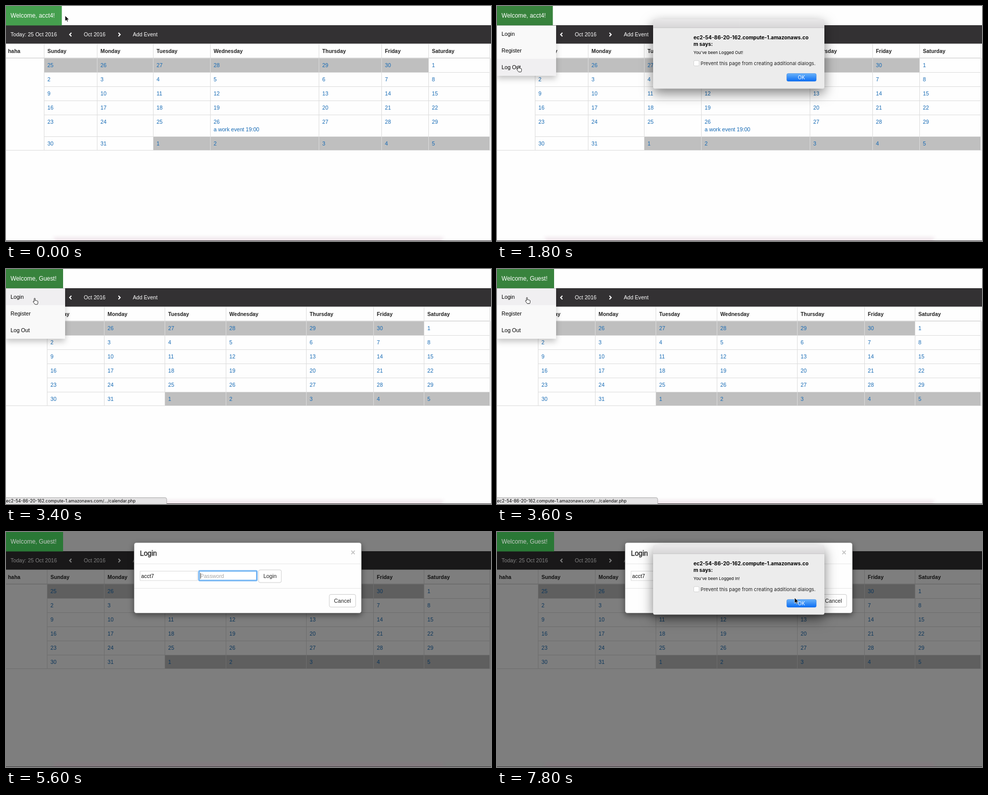
Write an HTML page that moves like this. It is 960 by 465 pixels and loops after 8 s.

```html
<!DOCTYPE html>
<html lang="en">
<head>
<meta charset="utf-8">
<title>Calendar login</title>
<style>
  html, body { margin: 0; width: 100%; height: 100%; overflow: hidden; background: #fefefe; }
  svg { display: block; width: 960px; height: 465px; font: 10.7px "Liberation Sans", Arial, sans-serif; }
  .link { fill: #1469b4; }
  .head { font-weight: bold; font-size: 10.4px; fill: #222; }
  .nav { fill: #fff; font-size: 10.6px; }
  .mac { font-family: Inter, sans-serif; }
  .menu { filter: drop-shadow(0 6px 6px rgba(0,0,0,.22)); }
  .modal { filter: drop-shadow(0 4px 6px rgba(0,0,0,.45)); }
  .alert { filter: drop-shadow(0 9px 12px rgba(0,0,0,.5)); }
</style>
</head>
<body>
<svg id="stage" viewBox="0 0 960 465"></svg>
<script>
const STEP = 200, LOOP = 8000;
const HOST = "ec2-54-86-20-162.compute-1.amazonaws.co";
const DAYS = ["Sunday", "Monday", "Tuesday", "Wednesday", "Thursday", "Friday", "Saturday"];
const OLD_USER = "acct4", NEW_USER = "acct7";

const rect = (x, y, w, h, fill, extra = "") =>
  `<rect x="${x}" y="${y}" width="${w}" height="${h}" fill="${fill}" ${extra}/>`;
const text = (x, y, s, extra = "") => `<text x="${x}" y="${y}" ${extra}>${s}</text>`;
const path = (d, stroke, width = 1, fill = "none") =>
  `<path d="${d}" fill="${fill}" stroke="${stroke}" stroke-width="${width}"/>`;
const middle = 'text-anchor="middle"';

const defs = `<defs>
  <linearGradient id="blue" x2="0" y2="1"><stop stop-color="#69b2fa"/><stop offset="1" stop-color="#0a6cf3"/></linearGradient>
  <linearGradient id="bar" x2="0" y2="1"><stop stop-color="#e9e8e9"/><stop offset="1" stop-color="#d8d7d8"/></linearGradient>
  <linearGradient id="dock" x2="0" y2="1"><stop stop-color="#a06080" stop-opacity="0"/><stop offset="1" stop-color="#a06080" stop-opacity=".16"/></linearGradient>
  <filter id="soft"><feGaussianBlur stdDeviation="3 0"/></filter>
</defs>`;

function calendar(cols, rows, event) {
  const bottom = rows[6];
  let cells = "", lines = "", labels = text(4, 92.7, "haha", 'class="head"');
  DAYS.forEach((day, i) => labels += text(cols[i] + 6.5, 92.7, day, 'class="head"'));
  for (let i = 0; i < 42; i++) {
    const row = Math.floor(i / 7), col = i % 7, x = cols[col], y = rows[row];
    const day = i < 6 ? 25 + i : (i - 6) % 31 + 1;
    if (i < 6 || i > 36) cells += rect(x, y, cols[col + 1] - x, rows[row + 1] - y, "#bfbfbf");
    labels += text(x + 6.5, y + 18.3, day, 'class="link"');
    if (event && i === 31) labels += text(x + 6.5, y + 33.2, event, 'class="link"');
  }
  cols.forEach(x => lines += `M${x} 75V${bottom}`);
  rows.slice(1, 6).forEach(y => lines += `M${cols[0]} ${y + .5}H957.5`);
  lines += `M0 ${bottom - .5}H957.5M959.5 103V${bottom}`;
  return rect(0, 0, 960, 465, "#fefefe") + rect(0, 38, 960, 36.5, "#333133")
    + text(9, 60.3, "Today: 25 Oct 2016", 'class="nav"')
    + text(154, 60.3, "Oct 2016", 'class="nav"') + text(251, 60.3, "Add Event", 'class="nav"')
    + path("M129.5 53L126 56.5L129.5 60M222.5 53L226 56.5L222.5 60", "#fff", 2)
    + cells + path(lines, "#dcdcdc") + path("M0 103H957.5", "#d6d6d6", 1.6) + labels;
}

const userPage = calendar([75.5, 180.5, 291.5, 404.5, 619.5, 743.5, 836.5, 957.5],
  [103, 131, 159, 187, 215, 258, 286], "a work event 19:00");
const guestPage = calendar([81.5, 194.5, 314.5, 435.5, 594.5, 727.5, 827.5, 957.5],
  [103, 131, 159, 187, 215, 243, 271]);

const welcome = (name, fill, ink = "#fff") =>
  rect(0, 0, name === "Guest" ? 113 : 110.5, 38.5, fill)
  + text(9, 22.5, `Welcome, ${name}!`, `font-size="11.9" fill="${ink}"`);

const menu = hovered => `<g class="menu">${rect(0, 38.5, 117, 99.5, "#f9f9f9")}</g>`
  + (hovered < 0 ? "" : rect(0, 38.5 + 33 * hovered, 117, 33, "#f0eff1"))
  + ["Login", "Register", "Log Out"].map((s, i) => text(9, 58.8 + 33 * i, s)).join("");

function field(x, value, hint, focused) {
  const ring = focused
    ? rect(x, 77, 114.5, 19, "#fff", 'rx="1.5" stroke="#74b5f3" stroke-width="3"')
    : rect(x + .5, 77.5, 113.5, 18.5, "#fff", 'stroke="#dadada"');
  const caretX = x + 3 + value.length * 5.6;
  return ring + text(x + 2.5, 90.5, value || hint, `fill="${value ? "#111" : "#a5a5a5"}"`)
    + (focused ? path(`M${caretX} 81V92.5`, "#333", .9) : "");
}

const button = (x, y, w, label, hot) =>
  rect(x, y, w, 25, hot ? "#e6e6e6" : "#fff", `rx="3" stroke="${hot ? "#adadad" : "#ccc"}"`)
  + text(x + w / 2, y + 16.4, label, `${middle} fill="#222"`);

function modal({ shift, opacity, user, password, focus, hot }) {
  return `<g class="modal" opacity="${opacity}" transform="translate(0 ${shift})">`
    + rect(253.5, 21, 450, 139.5, "#fefefe", 'rx="4.5" stroke="#777" stroke-width=".7"')
    + path("M254 63H703M254 111.5H703", "#e5e5e5")
    + text(265, 46.8, "Login", 'font-size="13.8" fill="#222" stroke="#222" stroke-width=".35"')
    + text(687, 45.5, "×", `${middle} font-size="16" font-weight="bold" fill="#c4c4c4"`)
    + field(265, user, "Username", focus === 1) + field(382, password, "Password", focus === 2)
    + button(500, 75, 45, "Login", hot) + button(640, 123.5, 52, "Cancel") + "</g>";
}

const alertBox = message => `<g class="alert">${rect(309, 26, 339, 137.5, "#ececec", 'rx="3.5"')}</g>`
  + path("M309 43V29.5q0-3.5 3.5-3.5H644.5q3.5 0 3.5 3.5V43Z", "none", 0, "url(#bar)")
  + path("M309 43H648", "#bdbcbd", .8)
  + '<g class="mac">'
  + text(389, 65.7, HOST, 'font-size="10.1" font-weight="700"')
  + text(389, 78.5, "m says:", 'font-size="10.1" font-weight="700"')
  + text(389, 94.8, message, 'font-size="8.2"')
  + rect(389.5, 108, 10.5, 10.5, "#fff", 'rx="2" stroke="#c4c4c4" stroke-width=".7"')
  + text(403, 116.8, "Prevent this page from creating additional dialogs.", 'font-size="9.6" fill="#222"')
  + rect(573.5, 133.5, 58.5, 15.5, "url(#blue)", 'rx="3" stroke="#2b7be0" stroke-width=".5"')
  + text(602.5, 144.8, "OK", `${middle} font-size="9.8" fill="#fff"`) + "</g>";

const status = rect(-2, 452.5, 320, 16, "#e4e3e4", 'rx="3" stroke="#aaa"')
  + text(0, 462, HOST + "m/.../calendar.php", 'class="mac" font-size="8.5"');

const screenEdge = rect(95, 452, 770, 12, "url(#dock)", 'filter="url(#soft)"')
  + rect(0, 464, 960, 1, "#3b383b");

const pointers = {
  arrow: path("M0 0V11L2.6 8.7 4.2 12.3 6 11.5 4.4 8H7.8Z", "#fff", .8, "#000"),
  hand: path("M2.3 7V1.3a1 1 0 0 1 2 0V5q1-.7 1.9.2 1-.5 1.9.5 1.3-.2 1.5 1V9.5q0 1.6-1 3H4Q2 10 .3 7.6 .2 6.2 1.4 6.2Z", "#111", .9, "#fff"),
  beam: path("M-2 0H2M0 0V11M-2 11H2", "#222", 1)
};

// Time, x, y, and the pointer shown until the next entry.
const route = [
  [0, 117, 19, "arrow"], [200, 108, 20, "hand"], [400, 75, 22, "hand"], [1000, 41.5, 89.5, "hand"],
  [1400, 39, 118, "hand"], [1800, 39, 118, "hand"], [2400, 600, 139, "hand"],
  [2600, 614.5, 140, "hand"], [2800, 614.5, 140, "arrow"], [3200, 80, 24, "hand"],
  [3400, 53.5, 57.5, "hand"], [3600, 56, 56, "hand"], [3800, 318, 152, "arrow"],
  [4000, 326, 110, "arrow"], [4200, 325, 82, "beam"], [4600, 325, 82, ""],
  [6800, 470, 86, "beam"], [7000, 521, 85, "hand"], [7400, 525, 88, "arrow"],
  [7800, 589, 130, "arrow"], [LOOP, 589, 130, "arrow"]
];

function cursor(t) {
  const i = route.findIndex(p => p[0] > t);
  const [t0, x0, y0, kind] = route[i - 1], [t1, x1, y1] = route[i];
  const k = (t - t0) / (t1 - t0);
  return kind && `<g transform="translate(${x0 + (x1 - x0) * k} ${y0 + (y1 - y0) * k})">${pointers[kind]}</g>`;
}

function scene(t) {
  const between = (a, b) => t >= a && t < b;
  const typed = (word, start) => word.slice(0, Math.max(0, (t - start) / STEP + 1));
  const guest = t >= 3000, login = t >= 3800;
  const menuOpen = between(400, 2800) || between(3200, 3800);
  const hovered = between(800, 1000) || between(3400, 3800) ? 0
    : between(1000, 1200) ? 1 : between(1200, 2800) ? 2 : -1;
  const green = menuOpen ? "#38833d" : "#459f4e";

  let out = guest ? guestPage : userPage;
  if (login) out += rect(0, 0, 960, 465, "#000", 'opacity=".5"');
  out += login ? welcome("Guest", "#2a7836", "#c4c8c4") : welcome(guest ? "Guest" : OLD_USER, green);
  if (menuOpen) out += menu(hovered);
  out += screenEdge;
  if (between(3400, 4000)) out += status;
  if (login) out += modal({
    shift: t < 4000 ? -18 : 0,
    opacity: t < 4000 ? .63 : 1,
    user: typed(NEW_USER, 4600),
    password: typed("•••••", 5800).replace(/•/g, "•"),
    focus: between(4400, 5600) ? 1 : t >= 5600 && t < 7200 ? 2 : 0,
    hot: between(7000, 7400)
  });
  if (between(1800, 2800)) out += alertBox("You've been Logged Out!");
  if (t >= 7400) out += alertBox("You've been Logged In!");
  return defs + out + cursor(t);
}

const stage = document.getElementById("stage");
let shown = -1;
function tick() {
  const t = Math.floor(performance.now() % LOOP / STEP) * STEP;
  if (t !== shown) stage.innerHTML = scene(shown = t);
  requestAnimationFrame(tick);
}
tick();
</script>
</body>
</html>
```
